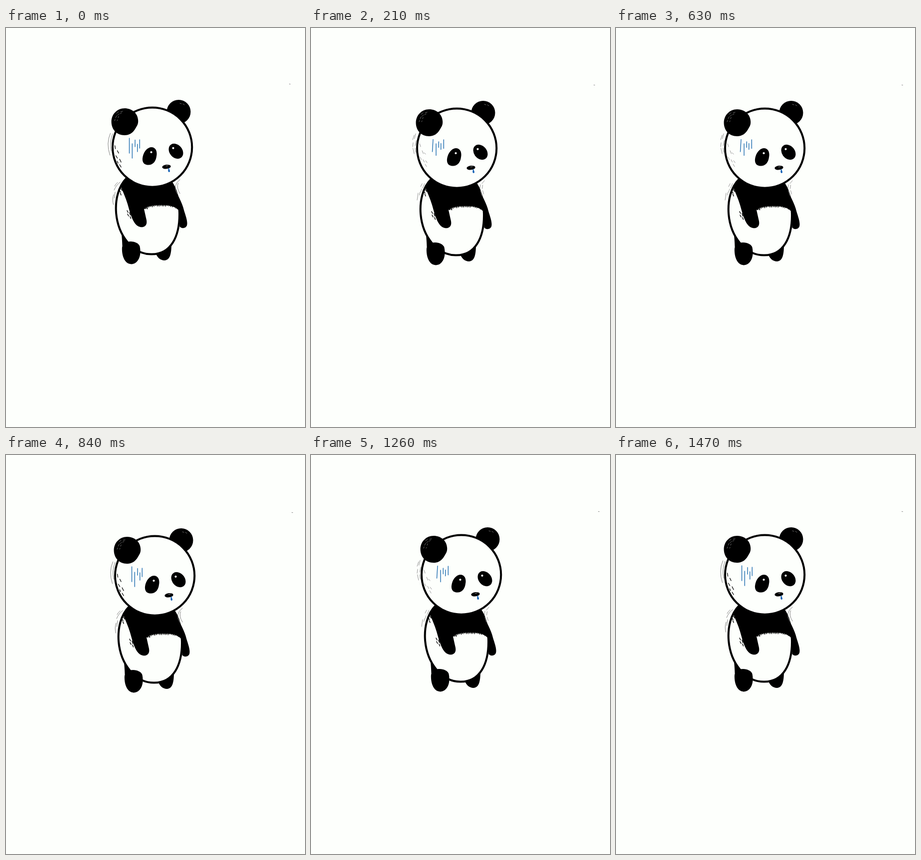
Write an HTML page that moves like this. It is 600 px wide and 800 px high and loops after 1680 ms.

```html
<!DOCTYPE html>
<html lang="en">
<head>
<meta charset="utf-8">
<title>Shivering panda</title>
<style>
html, body { margin: 0; width: 100%; height: 100%; overflow: hidden; background: #fdfffc; }
svg { display: block; width: 100%; height: 100%; }
.line { fill: none; stroke-linecap: round; }
.skin { fill: #fdfffc; stroke: #000; stroke-width: 4; }
</style>
</head>
<body>
<svg viewBox="0 0 600 800">
  <g id="panda">
    <!-- ear, foot and leg behind the outlines -->
    <circle cx="351.500" cy="169" r="24"/>
    <path d="M304 448C307 461 315 467 323 467C333 466 337 457 337 433Z"/>
    <path d="M235 403C238 417 238 430 239 447L258 438Z"/>

    <path class="skin" d="M247 302C230 319 224 346 226 372C230 418 260 455 297 454.500C335 455 354 420 353 371C352 342 346 322 335 308Z"/>
    <path d="M246 303L235 318C240 330 245 341 249 354C253 368 257 384 264 393C270 401 279 402 284 398C288 395 288 389 286 382L282 364
      C296 353 338 351 352 367L353.500 399C356 403 365 404 368 397C370 389 366 379 362 366C359 352 349 334 336 310Z"/>
    <path id="fur"/>
    <path d="M248 430C258 427 271 431 273.500 439C276 452 274 462 268 469C262 476 252 476 246 470C240 464 237 452 238 440Z"/>

    <circle class="skin" cx="298.600" cy="240.100" r="79.700"/>
    <path d="M243 162C258 162 269 172 270 185C271 193 268 197 265 202C260 211 253 216 243 216C227 216 216.500 204 216.500 189C216.500 174 228 162 243 162Z"/>
    <g class="line" stroke="#888" stroke-width=".8">
      <path d="M227 172l4-3M235 169l4-1M229 176l3-3M234 173l3-2M225 181l2-4M230 181l1-3M223 187l1-3M228 187l1-2"/>
      <path d="M354 152l3 1M360 153l3 2"/>
    </g>

    <path d="M297 240C305 240 309 248 307 258C306 267 301 275 292 275.500C283 276 278 271 279 262C280 251 288 240 297 240Z"/>
    <ellipse cx="346" cy="248" rx="12.800" ry="16.600" transform="rotate(-40 346 248)"/>
    <g fill="#fff">
      <circle cx="296.500" cy="250" r="2.100"/>
      <circle cx="340.500" cy="241.800" r="2.100"/>
    </g>
    <ellipse cx="327" cy="279.200" rx="8.700" ry="4.200" transform="rotate(-7 327 279.200)"/>
    <path class="line" d="M326 277.500l4-.5" stroke="#999"/>
    <path d="M331 281L330.300 287C330.300 291 334.300 290.500 334 287.500L332 282Z" fill="#1260b5"/>

    <path class="line" d="M236 323l2 4M233 328l2 2M234.500 332l1.500 4M248 367l2 4M253 371l1.500 5M249 374l2 4M254 379l1.500 4"
      stroke="#000" stroke-width="1.400"/>

    <g id="poseA" class="line">
      <path d="M252.500 222V252M258.300 233V262M264 225.500V239M268.700 234V249M273.200 225V242" stroke="#1f6db0" stroke-width="1.400"/>
      <path d="M223.500 237l1 6M228.500 247l2.500 5M225.500 257l3 5M233 264l3 6M228 268l2 4M233 275l3 5" stroke="#000" stroke-width="1.300"/>
      <path d="M214.500 212Q205.500 232 213.500 256M219 213Q212.500 229 216 247M234 310Q226 316 222 326M229 310.500Q225 314 223 318M221 335Q217.500 345 220.500 355M224 330L222.500 342
        M354 305Q338 317 349 334M350.500 312Q346.500 321 354 333" stroke="#858585"/>
    </g>
    <g id="poseB" class="line">
      <path d="M251 222.500L249.500 247M257 231V254.500M262.300 227V238.500M266.700 230.500V242.500M272.300 223V240.500" stroke="#1f6db0" stroke-width="1.400"/>
      <path d="M224 231l2 6M229 245l2.500 6M233 249l3 3M225 258l2.500 5M231 263l2.500 5M236 265l3 4M235 272l3 5" stroke="#969696"/>
      <path d="M216 211l-2.500 10M213 214l-3 9M217 225l-2 10M211 229l-1 8M210.500 240l2.500 11M215 240l1 8
        M234 311l-4 9M229 311l-3 6M228 322l-2 6M221 330l-2 14M225 328l-1.500 6
        M354 305l-5 6M346 313l-1 8M350.500 314l-1 7M346 325l3 10M350.500 325l2 7" stroke="#969696"/>
    </g>
    <path class="line" d="M573.500 113.300l2 .2" stroke="#8a8a8a"/>
  </g>
</svg>
<script>
const byId = id => document.getElementById(id);
const STEP = 210;

// pose, x shift, y shift
const shiver = [
  ["A", -5, -1], ["B", -6, 1], ["A", -5, -1], ["B", 0, 1],
  ["A", 0, 2], ["A", 0, 0], ["B", 3, 0], ["A", 0, 0]
];

function furPath() {
  let seed = 7;
  const rand = () => (seed = seed * 16807 % 2147483647) / 2147483647;
  const edge = x => {
    const u = ((x - 318) / 35) ** 2;
    return 355 + 3 * u + 6 * u * u;
  };
  const step = 3.4;
  let d = "M282 363";
  for (let x = 283; x < 349; x += step) {
    const tip = x + (x < 318 ? 2.2 : 1.2);
    d += `L${tip} ${edge(tip) + 2 + rand() * 3.5}L${x + step} ${edge(x + step)}`;
  }
  return d + "L352 364L318 350Z";
}

function draw(time) {
  const [pose, x, y] = shiver[Math.floor(time / STEP) % shiver.length];
  byId("panda").setAttribute("transform", `translate(${x} ${y})`);
  byId("poseA").style.display = pose === "A" ? "" : "none";
  byId("poseB").style.display = pose === "B" ? "" : "none";
}

byId("fur").setAttribute("d", furPath());
const start = performance.now();
function tick(now) {
  draw(Math.max(0, now - start));
  requestAnimationFrame(tick);
}
draw(0);
requestAnimationFrame(tick);
</script>
</body>
</html>
```
